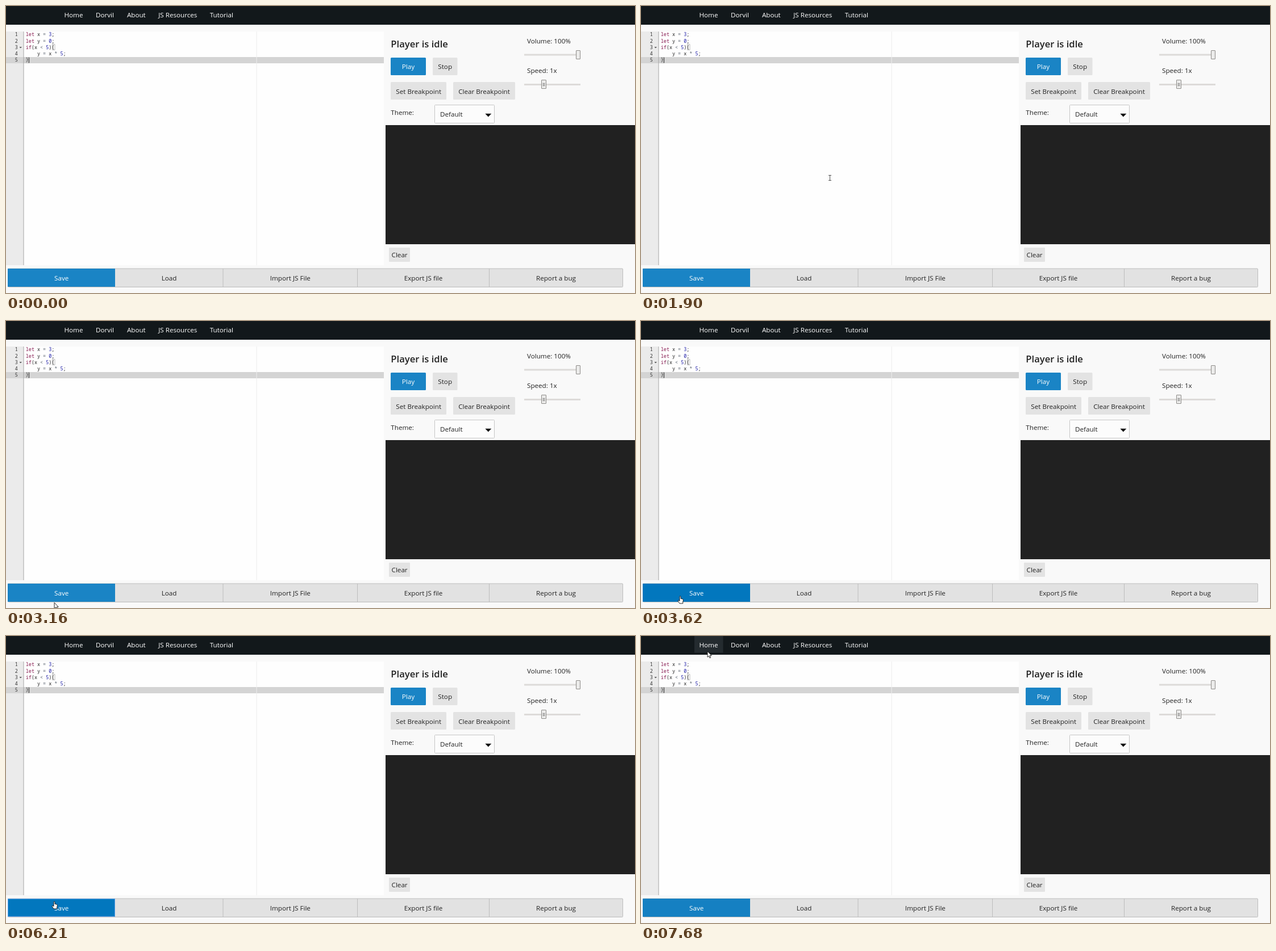
An HTML page that plays this animation: 1107x506 px, repeating every 8 s.

```html
<!DOCTYPE html>
<html lang="en">
<head>
<meta charset="utf-8">
<title>Code player</title>
<style>
  html, body { margin: 0; width: 100%; height: 100%; overflow: hidden; background: #f9f9f9; }
  svg { display: block; width: 100vw; height: 100vh; }
  text { font: 11.67px "Open Sans", "Noto Sans", sans-serif; fill: #222; }
  .mid text, text.mid { text-anchor: middle; }
  .light text, text.light { fill: #fff; }
  .code text { font: 8.42px "Noto Sans Mono", "DejaVu Sans Mono", monospace; white-space: pre; }
  .nums text { text-anchor: end; fill: #333; }
  .kw { fill: #86194f; }
  .op { fill: #56606d; }
  .num { fill: #1a1aa6; }
  .btn { fill: #e3e3e3; }
  .track { fill: #dddbd9; }
  .thumb { fill: #ebebea; stroke: #8d8b88; }
  .fine { fill: none; stroke: #bdbdbd; }
</style>
</head>
<body>
<svg viewBox="0 0 1107 506" preserveAspectRatio="none">
  <rect width="1107" height="506" fill="#f9f9f9"/>

  <rect width="1107" height="33" fill="#12181b"/>
  <rect id="home" x="94" width="50.5" height="29.5" fill="#242b2f"/>
  <g class="mid light">
    <text x="119" y="19.7">Home</text>
    <text x="174" y="19.7">Dorvil</text>
    <text x="229.3" y="19.7">About</text>
    <text x="302.3" y="19.7">JS Resources</text>
    <text x="379.3" y="19.7">Tutorial</text>
  </g>

  <g class="code">
    <rect y="45" width="665" height="412" fill="#fefefe"/>
    <rect y="45" width="31" height="412" fill="#ebebeb"/>
    <rect y="90" width="665" height="11" fill="#d4d4d4"/>
    <rect x="440.5" y="45" width="1" height="412" fill="#ececec"/>
    <rect x="30.5" y="45" width="1" height="412" fill="#a3a3a3"/>
    <g class="nums">
      <text x="20.8" y="53.4">1</text>
      <text x="20.8" y="64.6">2</text>
      <text x="20.8" y="75.7">3</text>
      <text x="20.8" y="86.9">4</text>
      <text x="20.8" y="98">5</text>
    </g>
    <path d="M23.5 72h4.4l-2.2 2.6z" fill="#555"/>
    <text x="34.8" y="53.4"><tspan class="kw">let</tspan> x <tspan class="op">=</tspan> <tspan class="num">3</tspan>;</text>
    <text x="34.8" y="64.6"><tspan class="kw">let</tspan> y <tspan class="op">=</tspan> <tspan class="num">0</tspan>;</text>
    <text x="34.8" y="75.7"><tspan class="kw">if</tspan>(x <tspan class="op">&lt;</tspan> <tspan class="num">5</tspan>){</text>
    <text x="55" y="86.9">y <tspan class="op">=</tspan> x <tspan class="op">*</tspan> <tspan class="num">5</tspan>;</text>
    <text x="34.8" y="98">}</text>
    <path class="fine" d="M81.5 67.5h4.5v10h-4.5zM35 90.5h4.5v10h-4.5z"/>
    <rect x="40" y="90.5" width="1" height="10" fill="#333"/>
  </g>

  <text x="677.3" y="72.6" style="font-size:16.6px;font-weight:600">Player is idle</text>
  <rect x="677" y="91" width="62" height="31" rx="1.5" fill="#1a84c5"/>
  <g class="btn">
    <rect x="751" y="91" width="43.5" height="31" rx="1.5"/>
    <rect x="677" y="134" width="98" height="31" rx="1.5"/>
    <rect x="787" y="134" width="109" height="31" rx="1.5"/>
    <rect x="674" y="426" width="37" height="25" rx="1"/>
  </g>
  <g class="mid">
    <text class="light" x="708" y="111.4">Play</text>
    <text x="772.7" y="111.4">Stop</text>
    <text x="726.2" y="154.5">Set Breakpoint</text>
    <text x="841.5" y="154.5">Clear Breakpoint</text>
    <text x="692.6" y="443">Clear</text>
  </g>
  <text x="677.3" y="191.7">Theme:</text>
  <rect x="754.5" y="174.5" width="105" height="32" rx="1" fill="#fcfcfc" stroke="#c6c6c6"/>
  <text x="764" y="195.3">Default</text>
  <path d="M843.3 189.8h11l-5.5 5.8z" fill="#111"/>

  <text x="917" y="66">Volume: 100%</text>
  <rect class="track" x="912" y="84.5" width="99" height="3"/>
  <rect class="thumb" x="1003.5" y="78.5" width="7" height="15" rx=".5"/>
  <text x="917" y="118.2">Speed: 1x</text>
  <rect class="track" x="912" y="137" width="99" height="3"/>
  <rect class="thumb" x="942.5" y="130.5" width="8" height="15" rx=".5"/>
  <path d="M944.5 136.5h4M944.5 138.5h4M944.5 140.5h4" stroke="#777"/>

  <rect x="668" y="210" width="439" height="210" fill="#212121"/>

  <rect x="3.5" y="463" width="1082" height="32.5" rx="1" fill="#e2e2e2" stroke="#bcbcbc"/>
  <path class="fine" d="M382 463v32M618.5 463v32M850.5 463v32"/>
  <rect id="save" x="3.5" y="463.5" width="188" height="31" fill="#1a84c5"/>
  <g class="mid">
    <text class="light" x="97.7" y="483.7">Save</text>
    <text x="287" y="483.7">Load</text>
    <text x="500.3" y="483.7">Import JS File</text>
    <text x="734.5" y="483.7">Export JS file</text>
    <text x="968" y="483.7">Report a bug</text>
  </g>

  <g id="pointer" stroke="#111" stroke-width=".9" stroke-linejoin="round" fill="#fff">
    <path id="arrow" d="M0 0V10.2L2.4 8.2 4 11.8 5.6 11.1 4.1 7.6H7.2z"/>
    <path id="beam" d="M-2.5-4.5H2.5M0-4.5V4.5M-2.5 4.5H2.5" stroke="#444"/>
    <path id="hand" d="M-1 1.2Q-1 0 0 0 1 0 1 1.2V4.4L4.5 5.3Q5.5 5.7 5.4 7L4.7 10.2V13H-1L-3.6 9.3Q-4.3 7.8-3.2 7.3L-1 8.6z"/>
  </g>
</svg>
<script>
const LOOP = 8000;
const $ = id => document.getElementById(id);

// Each stroke is a list of [time, x, y]; the pointer rests between strokes.
const strokes = [
  [[800, 1012, 500], [1000, 850, 444], [1250, 610, 378], [1570, 474.5, 341]],
  [[1780, 466, 339], [1900, 332.5, 303], [2080, 205, 237], [2300, 112, 270], [2570, 76, 394]],
  [[2600, 74.5, 405.5], [2750, 84, 440], [2920, 121, 478], [3040, 132, 490], [3230, 61, 499], [3380, 66, 500]],
  [[3420, 68, 498], [3620, 69, 485], [3810, 97, 480], [3970, 84, 477]],
  [[6210, 85, 468], [6350, 112, 295], [6530, 127, 153.5]],
  [[6740, 128, 151], [6850, 137, 100], [6960, 122, 38.5], [7050, 118, 15], [7150, 117, 27]]
];

// Hermite curve through the points, at rest at both ends.
function along(pts, t) {
  const slope = (k, d) => k > 0 && k < pts.length - 1
    ? (pts[k + 1][d] - pts[k - 1][d]) / (pts[k + 1][0] - pts[k - 1][0]) : 0;
  const last = pts.length - 1;
  if (t >= pts[last][0]) return pts[last].slice(1);
  let i = 0;
  while (t >= pts[i + 1][0]) i++;
  const span = pts[i + 1][0] - pts[i][0], u = (t - pts[i][0]) / span;
  return [1, 2].map(d => {
    const a = pts[i][d], b = pts[i + 1][d];
    return a + (b - a) * u * u * (3 - 2 * u)
      + span * u * (1 - u) * ((1 - u) * slope(i, d) - u * slope(i + 1, d));
  });
}

const inside = (x, y, l, t, r, b) => x >= l && x < r && y >= t && y < b;
const show = (id, on) => $(id).setAttribute("visibility", on ? "visible" : "hidden");

function draw(t) {
  const stroke = strokes.filter(s => s[0][0] <= t).pop();
  const [x, y] = stroke ? along(stroke, t) : [-50, -50];
  const onHome = inside(x, y, 94, 0, 144.5, 30);
  const onSave = inside(x, y, 3, 463, 192, 495);
  const onBar = inside(x, y, 3, 463, 1085, 495);
  const inEditor = inside(x, y, 31, 45, 665, 457);
  const shape = inEditor ? "beam" : onBar || onHome && t < 7680 ? "hand" : "arrow";

  $("pointer").setAttribute("transform", `translate(${x} ${y})`);
  for (const id of ["arrow", "beam", "hand"]) show(id, stroke && id === shape);
  show("home", onHome);

  const focus = t >= 4790 && t < 7550;
  const fill = focus || onSave ? "#0277be" : t >= 7680 ? "#1580c2" : t >= 7550 ? "#0a7bc0" : "#1a84c5";
  $("save").setAttribute("fill", fill);
  $("save").setAttribute("stroke", focus ? "#5a9fe6" : fill);
}

let start;
function tick(now) {
  start ??= now;
  draw((now - start) % LOOP);
  requestAnimationFrame(tick);
}
draw(0);
requestAnimationFrame(tick);
</script>
</body>
</html>
```
